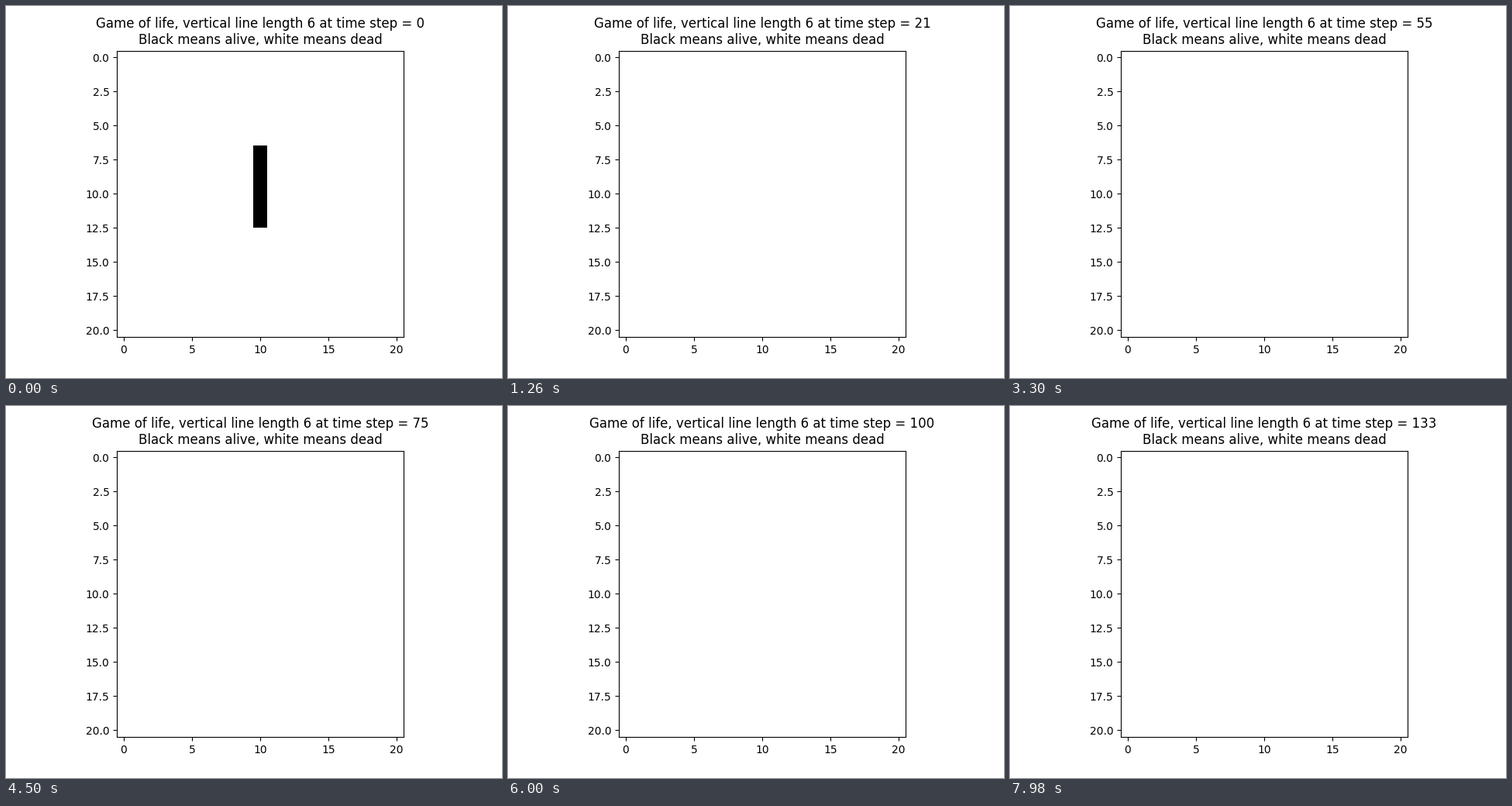
A matplotlib script for the animation above (8 s loop, 640 px wide and 480 px high).

```python
import matplotlib.pyplot as plt
import numpy as np
from matplotlib.animation import FuncAnimation

SIZE = 21
LENGTH = 6
STEPS = 134
TICK_MS = 20
LOOP_MS = 8000
TICKS_PER_STEP = 3


def evolve(grid):
    padded = np.pad(grid, 1)
    block = sum(padded[r:r + SIZE, c:c + SIZE]
                for r in range(3) for c in range(3))
    # block counts the cell itself: 3 gives life, 4 keeps a living cell
    return ((block == 3) | ((block == 4) & (grid == 1))).astype(int)


def title_text(step):
    return (f"Game of life, vertical line length {LENGTH} at time step = {step}\n"
            "Black means alive, white means dead")


start = np.zeros((SIZE, SIZE), dtype=int)
top = SIZE // 2 - LENGTH // 2
start[top:top + LENGTH, SIZE // 2] = 1
history = [start]
while len(history) < STEPS:
    history.append(evolve(history[-1]))

fig, ax = plt.subplots(figsize=(6.4, 4.8), dpi=100)
image = ax.imshow(start, cmap="binary", vmin=0, vmax=1)
title = ax.set_title(title_text(0))


def update(tick):
    step = tick // TICKS_PER_STEP
    image.set_data(history[step])
    title.set_text(title_text(step))
    return image, title


anim = FuncAnimation(fig, update, frames=LOOP_MS // TICK_MS,
                     init_func=lambda: update(0), interval=TICK_MS,
                     repeat=True, repeat_delay=0)
plt.show()
```
